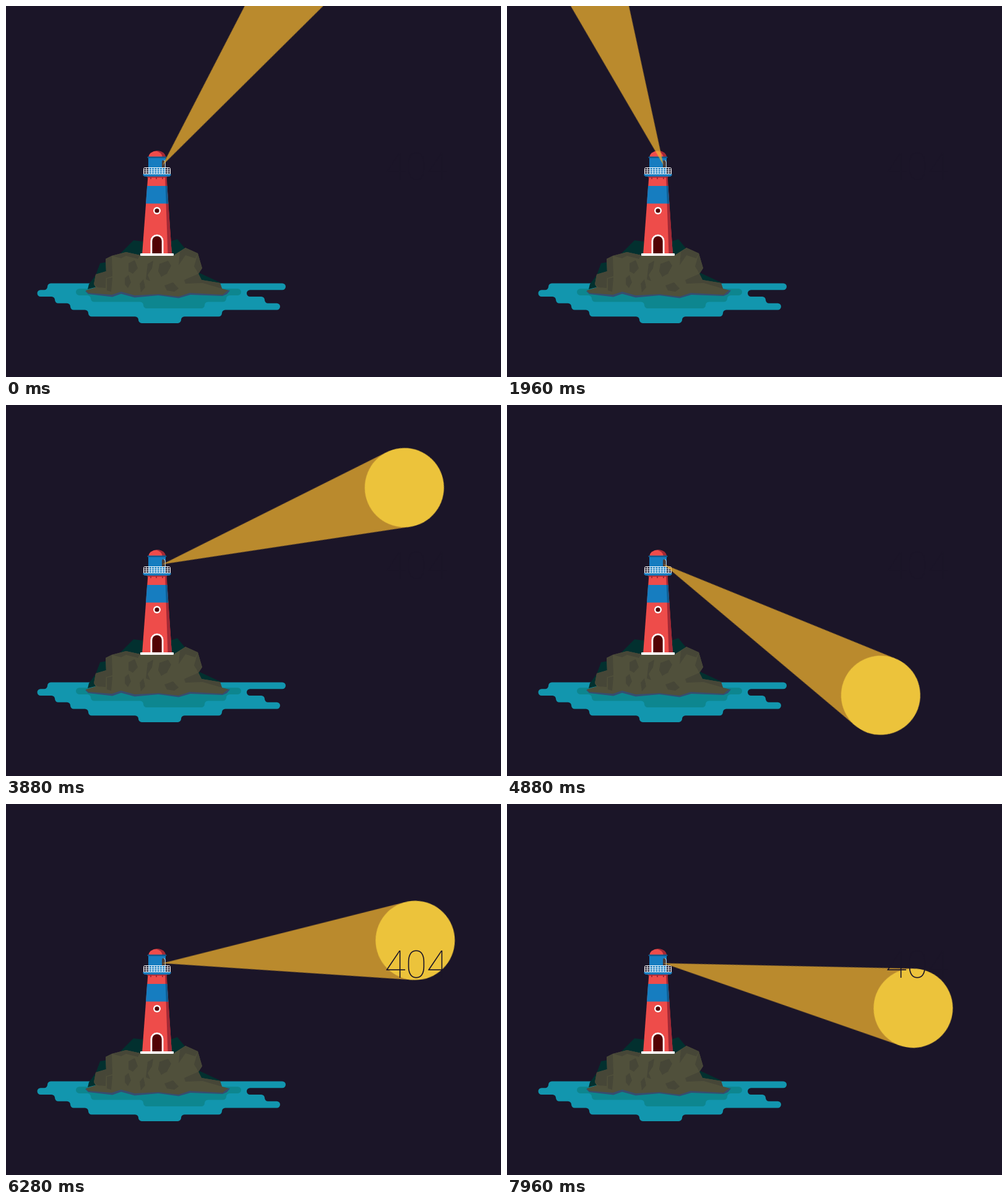
Recreate the animation shown at these times as an HTML page. Size 800 by 600 pixels, loop 8000 ms.

```html
<!DOCTYPE html>
<html lang="en">
<head>
<meta charset="utf-8">
<title>Lighthouse</title>
<style>
  html, body { margin: 0; width: 100%; height: 100%; overflow: hidden; background: #1b1528; }
  svg { display: block; width: 100%; height: 100%; }
  .sea { fill: #1296ae; }
  .sea-shade { fill: #0d868f; }
  .waterline { fill: #364e70; }
  .back-rock { fill: #02302f; }
  .rock { fill: #50503b; }
  .facet { fill: #464637; }
  .red { fill: #ee4c4a; }
  .red-shade { fill: #a32935; }
  .blue { fill: #167dc0; }
  .blue-shade { fill: #0f5c91; }
  .white { fill: #fff; }
  .hole { fill: #520204; }
  .line { fill: none; stroke: #fff; }
  .code { font: 100 62px Roboto, "Open Sans", sans-serif; fill: #1b1528; }
  .beam { animation: sweep 8s linear infinite; }
  @keyframes sweep {
    0% { transform: translate(253px, 257.5px) rotate(-53.7deg); }
    17.5%, 21.5% { transform: translate(253px, 257.5px) rotate(-123deg); }
    61%, 64.5% { transform: translate(253px, 257.5px) rotate(31.13deg); }
    81.5%, 86% { transform: translate(253px, 257.5px) rotate(-12.9deg); }
    100% { transform: translate(253px, 257.5px) rotate(11.05deg); }
  }
</style>
</head>
<body>
<svg viewBox="0 0 800 600">
  <path class="sea" id="sea"/>
  <path class="sea-shade" id="shade"/>
  <path class="waterline" d="M128 461L133 466 172 470.5 186 465.5 208 471.5 246 468 279 472.5 298 467 350 469 357 466 362 460 347 457 140 457Z"/>

  <g class="back-rock">
    <path d="M183 402L206 379 222 381 265 381 277 377 290 393 280 410Z"/>
    <path d="M132 458L134 450 145 435 152 416 164 414 164 450Z"/>
    <path d="M311 431L348 448 312 450Z"/>
  </g>
  <path class="rock" d="M129 460L145 455 142 450 145 434 162 429 161 409 171 404 194 398 217 403 271 403 290 391 310 400 317 424 311 433 316 443 346 448 349 457 359 460 350 467 297 464 279 470 247 466 208 468 186 462 171 467 133 464Z"/>
  <g class="facet">
    <path d="M161 409L171 404 172 437 162 440Z"/>
    <path d="M171 404L194 398 217 403 213 409 194 404 186 408Z"/>
    <path d="M145 434L162 429 161 456 148 455 142 450Z"/>
    <path d="M163 441L172 439 170 462 163 460Z"/>
    <path d="M198 416L208 411 213 424 205 433 198 429Z"/>
    <path d="M192 440L198 435 202 447 197 456 192 450Z"/>
    <path d="M229 417L238 412 236 424 229 435 233 445 226 442Z"/>
    <path d="M248 417L262 412 267 420 260 433 251 438 246 429Z"/>
    <path d="M290 391L310 400 306 408 290 403 279 419 281 398Z"/>
    <path d="M310 400L317 424 311 433 304 421Z"/>
    <path d="M288 443L311 433 316 443 346 448 349 457 318 448 290 449Z"/>
    <path d="M216 449L222 442 225 455 218 463Z"/>
    <path d="M256 452L270 447 279 457 272 462 260 460Z"/>
  </g>

  <path class="red" d="M229.5 274H259L268 402H220Z"/>
  <path class="red-shade" d="M257 274H259.5L268 402H261.5Z"/>
  <path class="blue" d="M228 291H260.4L262.3 319.5H226Z"/>
  <path class="blue-shade" d="M257.8 291H260.4L262.3 319.5H258.8Z"/>
  <circle class="white" cx="244" cy="331" r="6"/>
  <circle class="hole" cx="244" cy="331" r="3.6"/>
  <path class="white" d="M233.5 401V380A10.5 10.5 0 0 1 254.5 380V401Z"/>
  <path class="hole" d="M236.3 401V380A7.7 7.7 0 0 1 251.7 380V401Z"/>
  <rect class="white" x="217" y="400" width="54" height="4" rx="1"/>

  <path class="red-shade" d="M226 275H262L259 277.5H229Z"/>
  <path class="red-shade" d="M233 277h2v3h-2zm9 0h2v3h-2zm10 0h2v3h-2z"/>
  <path class="red" d="M230.5 244A13.5 9.7 0 0 1 257.5 244Z"/>
  <path class="red-shade" d="M242 234.4A13.5 9.7 0 0 1 257.8 244H252.5Q252 236.5 242 234.4Z"/>
  <rect class="blue" x="230" y="245" width="28" height="28"/>
  <rect class="blue-shade" x="228.5" y="243.5" width="31" height="2.6" rx="1"/>
  <rect x="252" y="249.5" width="5" height="12.5" rx="2" fill="#493c38"/>
  <path class="line" d="M255 249.5Q257.3 250 257.3 253V262" stroke-opacity=".75"/>
  <path class="blue" d="M221.5 271.5H266.5V274L264 275.8H224L221.5 274Z"/>
  <path class="line" id="rail"/>

  <g class="beam">
    <path d="M0 0L400 -63.2V63.2Z" fill="#efb12f" fill-opacity=".75"/>
    <circle cx="410" r="64" fill="#ecc33b"/>
  </g>
  <text class="code" x="612" y="281">404</text>
</svg>
<script>
  const setPath = (id, d) => document.getElementById(id).setAttribute('d', d);

  // Stacked rows with round ends, joined by round inner corners.
  function puddle(top, r, rows) {
    const arc = (x, y, sweep) => `A${r} ${r} 0 0 ${sweep} ${x} ${y}`;
    const mid = i => top + (2 * i + 1) * r;
    const step = (from, to, y, endY, outward) => {
      const s = Math.sign(to - from);
      const convexFirst = s !== outward ? 1 : 0;
      return arc(from + s * r, y, convexFirst) + `H${to - s * r}` + arc(to, endY, 1 - convexFirst);
    };
    const last = rows.length - 1;
    let d = `M${rows[0][0] + r} ${top}H${rows[0][1] - r}` + arc(rows[0][1], mid(0), 1);
    for (let i = 0; i < last; i++)
      d += step(rows[i][1], rows[i + 1][1], mid(i) + r, mid(i + 1), 1);
    d += arc(rows[last][1] - r, mid(last) + r, 1) + `H${rows[last][0] + r}` + arc(rows[last][0], mid(last), 1);
    for (let i = last; i > 0; i--)
      d += step(rows[i][0], rows[i - 1][0], mid(i) - r, mid(i - 1), -1);
    return d + arc(rows[0][0] + r, top, 1) + 'Z';
  }

  setPath('sea', puddle(448.5, 5.37, [[67, 452], [50.5, 389], [79, 418], [104, 443], [133, 349], [214, 283]]));
  setPath('shade', puddle(457.3, 5.3, [[113, 380], [137, 356], [222, 321]]));

  let rail = 'M222.5 271.5V263.5Q222.5 261.5 224.5 261.5H263.5Q265.5 261.5 265.5 263.5V271.5Z';
  for (const y of [265, 268.3]) rail += `M222.5 ${y}H265.5`;
  for (let i = 1; i < 10; i++) rail += `M${222.5 + i * 4.3} 261.5V271.5`;
  setPath('rail', rail);
</script>
</body>
</html>
```
